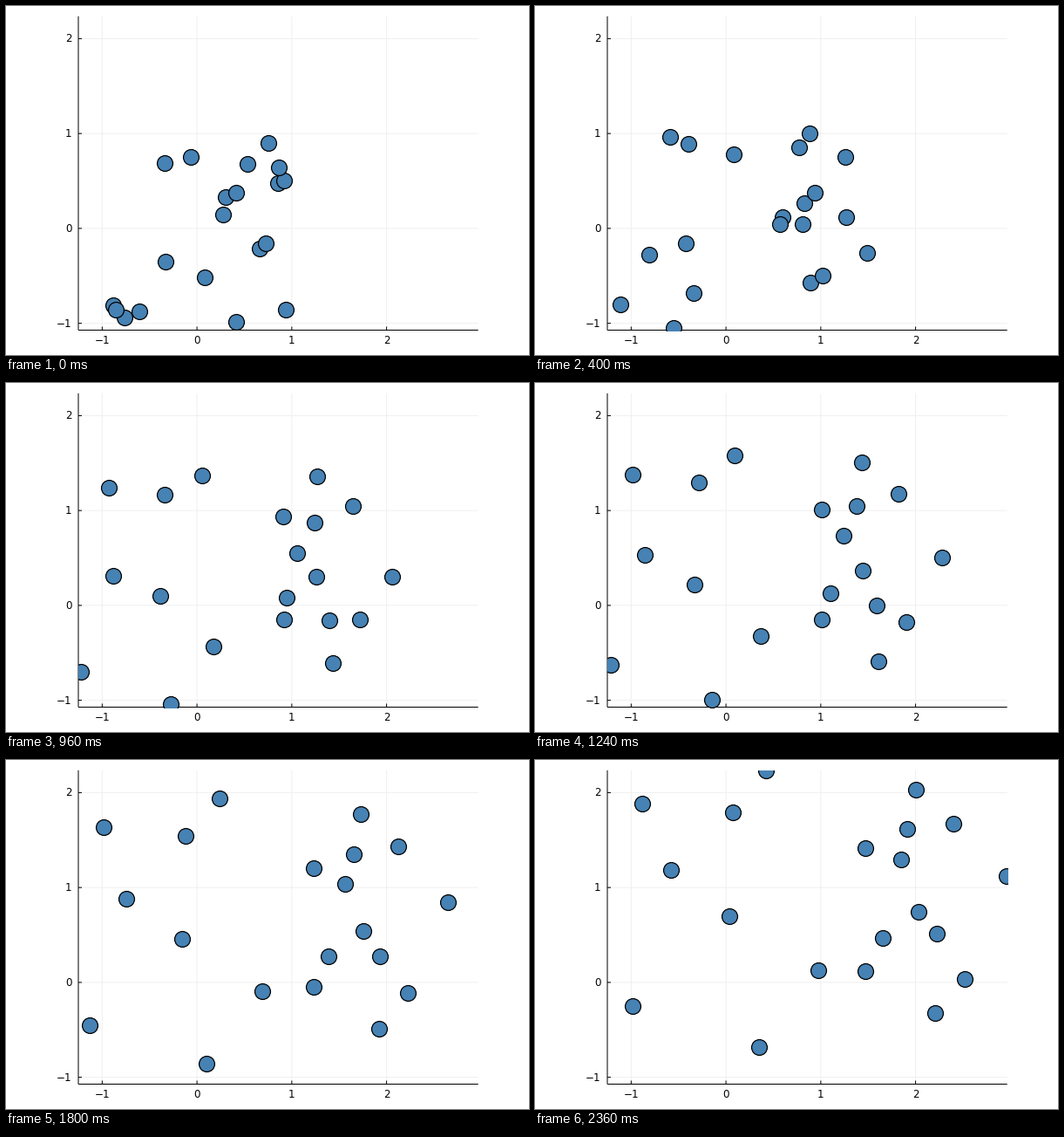
Write a matplotlib script that moves like this. It is 600 px wide and 400 px high and loops after 2.46 s.

```python
import numpy as np
import matplotlib.pyplot as plt
from matplotlib.animation import FuncAnimation
from matplotlib.patches import Rectangle

W, H, DPI = 600, 400, 100
PX = 72 / DPI                      # one pixel in points
LEFT, RIGHT, TOP, BOTTOM = 83, 541.7, 11.8, 371.5
UNIT, X0, Y0 = 108.75, 219.1, 254.9
STEPS, TICK, TICKS = 50, 20, 123

# Two key points per particle, start and end in pixels; flocking does the rest.
PATHS = np.array([
    (212, 173, 123, 50), (182, 180, 227, 60), (249, 239, 265, 12),
    (277, 181, 437, 34), (301, 157, 379, 101), (252, 219, 399, 204),
    (264, 214, 440, 174), (264, 362, 461, 199), (291, 278, 459, 290),
    (298, 272, 427, 79), (228, 311, 420, 114), (312, 203, 379, 242),
    (319, 200, 480, 73), (313, 185, 493, 251), (321, 348, 541, 133),
    (153, 350, 156, 126), (183, 293, 223, 179), (123, 343, 112, 282),
    (136, 357, 257, 329), (126, 348, 325, 241)]) + 0.3
START, END = PATHS[:, :2], PATHS[:, 2:]


def flock(vel, coupling=0.096, beta=0.4):
    """Cucker-Smale flocking: each velocity drifts towards the others."""
    pos, track = START, [START]
    for _ in range(STEPS):
        gap = (pos[None] - pos[:, None]) / UNIT
        weight = (1 + (gap ** 2).sum(axis=2)) ** -beta
        pull = weight @ vel - weight.sum(axis=1)[:, None] * vel
        new = vel + coupling * pull / len(pos)
        pos = pos + (vel + new) / 2
        vel = new
        track.append(pos)
    return np.array(track)


def solve():
    """Find the launch velocities that carry START to END."""
    vel = (END - START) / STEPS
    for _ in range(40):
        vel = vel + 0.03 * (END - flock(vel)[-1])
    return flock(vel)


track = solve()

fig = plt.figure(figsize=(W / DPI, H / DPI), dpi=DPI, facecolor="white")
ax = fig.add_axes([0, 0, 1, 1])
ax.set_xlim(0, W)
ax.set_ylim(H, 0)
ax.axis("off")


def line(x, y, color="black", z=2):
    ax.plot(x, y, color=color, lw=PX, zorder=z, snap=False,
            solid_capstyle="butt")


def label(x, y, value, align):
    ax.text(x, y, str(value).replace("-", "\u2212"), ha=align, va="baseline",
            family="DejaVu Sans", size=8.6, color="black")


for v in (-1, 0, 1, 2):
    x, y = X0 + UNIT * v, Y0 - UNIT * v
    line([x, x], [TOP, BOTTOM], "#f0f0f0", 1)
    line([LEFT, RIGHT], [y, y], "#f0f0f0", 1)
    line([x, x], [BOTTOM, BOTTOM - 4])
    line([LEFT, LEFT + 4], [y, y])
    label(x, 387.3, v, "center")
    label(75.5, y + 4, v, "right")

line([LEFT, RIGHT], [BOTTOM, BOTTOM])
line([LEFT, LEFT], [TOP, BOTTOM])

dots = ax.scatter(*START.T, s=(17.9 * PX) ** 2, facecolor="steelblue",
                  edgecolor="black", linewidth=1.25 * PX, zorder=3)
dots.set_clip_path(Rectangle((LEFT, TOP), RIGHT - LEFT, BOTTOM - TOP,
                             transform=ax.transData))


def step_at(tick):
    """Three steps per seven ticks: the middle one is held for five."""
    cycle, phase = divmod(tick, 7)
    return min(3 * cycle + (phase > 0) + (phase > 5), STEPS)


def draw(tick):
    dots.set_offsets(track[step_at(tick)])
    return (dots,)


anim = FuncAnimation(fig, draw, frames=TICKS, interval=TICK,
                     repeat=True, repeat_delay=0, blit=False)
plt.show()
```
